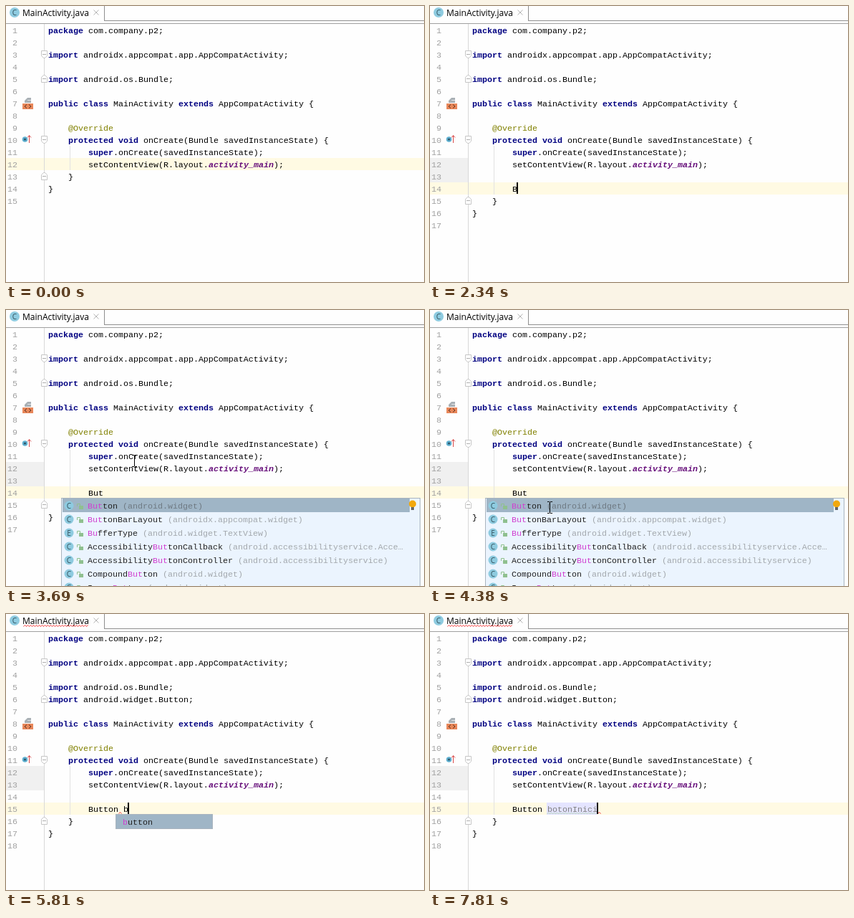
Write an HTML page with a canvas that moves like this. It is 584 px wide and 385 px high and loops after 8 s.

```html
<!DOCTYPE html>
<html lang="en">
<head>
<meta charset="utf-8">
<title>Code editor</title>
<style>
html, body { margin: 0; width: 584px; height: 385px; overflow: hidden; background: #fefefe; }
canvas { display: block; }
</style>
</head>
<body>
<canvas id="stage" width="584" height="385"></canvas>
<script>
const c = document.getElementById('stage').getContext('2d');
const LOOP = 8000, CELL = 7, ROW = 17, LEFT = 58, TOP = 25;
const MONO = "11.667px 'Liberation Mono', 'Courier New', monospace";
const INK = { k: '#000080', a: '#808000', f: '#660e7a', t: '#000', u: '#808080' };
const STYLE = { k: 'bold ', f: 'italic bold ' };

const rowTop = n => TOP + (n - 1) * ROW;
const colX = n => LEFT + n * CELL;
const textX = n => colX(n) + 1;

// Value of the last [time, value] step reached at t
function at(t, steps) {
  let v = null;
  for (const s of steps) if (t >= s[0]) v = s[1];
  return v;
}
function box(x, y, w, h, color) {
  c.fillStyle = color;
  c.fillRect(x, y, w, h);
}
function text(s, x, y, color, style = '') {
  c.font = style + MONO;
  c.fillStyle = color;
  c.fillText(s, x, y);
  return x + s.length * CELL;
}
function path(points, stroke, fill) {
  c.beginPath();
  points.forEach(([x, y], i) => i ? c.lineTo(x, y) : c.moveTo(x, y));
  if (fill) { c.closePath(); c.fillStyle = fill; c.fill(); }
  if (stroke) { c.strokeStyle = stroke; c.lineWidth = 1; c.stroke(); }
}
function disc(x, y, r, color) {
  c.beginPath();
  c.arc(x, y, r, 0, Math.PI * 2);
  c.fillStyle = color;
  c.fill();
}
function wave(x0, x1, y, color) {
  const pts = [];
  for (let x = x0, i = 0; x <= x1; x += 2, i++) pts.push([x + .5, y + (i % 2 ? 0 : 2)]);
  path(pts, color);
}
function badge(x, y, letter, r = 7) {
  disc(x, y, r, '#8ecbe0');
  c.textAlign = 'center';
  c.font = "10px 'Open Sans', sans-serif";
  c.fillStyle = '#31505c';
  c.fillText(letter, x, y + 3.6);
  c.textAlign = 'left';
}

// Markup: "x:words" pieces joined by "|", x being the ink
const code = [
  'k:package|t: com.company.p2;', '',
  'k:import|t: androidx.appcompat.app.AppCompatActivity;', '',
  'k:import|t: android.os.Bundle;', '',
  'k:public class|t: MainActivity |k:extends|t: AppCompatActivity {', '',
  'a:    @Override',
  'k:    protected void|t: onCreate(Bundle savedInstanceState) {',
  'k:        super|t:.onCreate(savedInstanceState);',
  't:        setContentView(R.layout.|f:activity_main|t:);',
  't:    }', 't:}', ''
];
function drawLine(src, n) {
  let x = textX(0);
  if (!src) return;
  for (const part of src.split('|')) {
    const ink = part[0];
    x = text(part.slice(2), x, rowTop(n) + 13, INK[ink], STYLE[ink]);
  }
}

const typed = [
  [0, ''], [2340, 'B'], [2490, 'Bu'], [2710, 'But'], [4520, 'Button'], [5360, 'Button '],
  [5650, 'Button b'], [6030, 'Button bot'], [6170, 'Button boto'], [6620, 'Button boton'],
  [7070, 'Button botonI'], [7230, 'Button botonIn'], [7370, 'Button botonIni'],
  [7510, 'Button botonInic'], [7670, 'Button botonInici']
];
const caretOn = [[0, false], [970, true], [3250, false], [3768, true], [4380, false], [4520, true]];
const extraRows = [[0, 0], [1260, 1], [1570, 2]];
const analysed = [[0, 0], [6400, 4], [6930, 5], [7230, 6], [7370, 8], [7510, 9], [7810, 10]];
const pointer = [
  [0, null], [290, [500, 371]], [370, [485, 300]], [450, [476, 244]],
  [590, [472, 238]], [670, [468, 232]], [810, [440, 226]], [890, [412, 221]], [970, [391, 220]],
  [1260, null], [3250, [391, 200]], [3324, [375, 160]], [3398, [343, 131]], [3472, [298, 130]],
  [3546, [248, 152]], [3620, [204, 186]], [3690, [179, 210]], [3768, [172, 242]],
  [3842, [168, 262]], [3916, [167, 272]], [3990, [167, 275]],
  [4750, [190, 274]], [4823, [215, 272]], [4897, [231, 272]], [4970, [234, 272]], [5360, null]
];

const items = [
  ['C', 'Button', '(android.widget)'],
  ['C', 'ButtonBarLayout', '(androidx.appcompat.widget)'],
  ['E', 'BufferType', '(android.widget.TextView)'],
  ['C', 'AccessibilityButtonCallback', '(android.accessibilityservice.Acce…'],
  ['C', 'AccessibilityButtonController', '(android.accessibilityservice)'],
  ['C', 'CompoundButton', '(android.widget)'],
  ['C', 'ImageButton', '(android.widget)']
];

function matched(name, query, x, y) {
  let q = query;
  while (!name.includes(q)) q = q.slice(0, -1);
  const i = name.indexOf(q);
  x = text(name.slice(0, i), x, y, '#222');
  x = text(q, x, y, '#d03fd0');
  return text(name.slice(i + q.length), x, y, '#222');
}
function drawLock(x, y) {
  box(x + 2, y, 6, 5, '#8fc08f');
  path([[x - .5, y + 1], [x - .5, y - 2.5], [x + 3.5, y - 2.5], [x + 3.5, y]], '#8fc08f');
}
function drawList(query, count, bulb) {
  const h = count * 19 + 2;
  box(77, 262, 502, h, '#a9b4be');
  box(78, 263, 500, h - 2, '#ebf4fe');
  box(79, 263, 485, 19, '#9fb5c6');
  items.slice(0, count).forEach(([kind, name, where], i) => {
    const y = 273 + i * 19;
    badge(88, y, kind, 6.5);
    drawLock(100, y);
    const x = matched(name, query, 114, y + 4);
    text(where, x + CELL, y + 4, i ? '#a3a8ad' : '#6f7a83');
  });
  if (count === 3) {
    box(564, 306, 14, 14, '#b9bec3');
    box(565, 307, 12, 12, '#e6e8ea');
    c.font = "bold 12px 'DejaVu Sans', sans-serif";
    c.fillStyle = '#555';
    c.fillText('π', 567, 317);
  }
  if (bulb) {
    disc(568, 270.5, 5, '#f2a80c');
    box(566, 275, 4, 4, '#666');
  }
}
function drawHint() {
  box(153, 279, 136, 21, '#a9b4be');
  box(154, 280, 134, 19, '#9fb5c6');
  matched('button', 'b', 163, 294);
}

function drawTabs(error) {
  box(0, 0, 584, 25, '#fefefe');
  box(137, 0, 1, 21, '#8f8f8f');
  box(137, 20, 447, 1, '#8f8f8f');
  box(0, 24, 584, 1, '#a0a0a0');
  badge(12, 9, 'C');
  c.font = "12px 'Open Sans', 'Noto Sans', sans-serif";
  c.fillStyle = '#000';
  c.fillText('MainActivity.java', 23, 14);
  path([[122.5, 5.5], [129.5, 12.5]], '#b4b4b4');
  path([[129.5, 5.5], [122.5, 12.5]], '#b4b4b4');
  if (error) wave(24, 115, 15.5, '#f03030');
}
function drawFold(n, dir) {
  const y = rowTop(n) + 9;
  const pts = [[-4, -5], [4, -5], [4, 2], [1, 5], [-1, 5], [-4, 2], [-4, -5]];
  path(pts.map(([a, b]) => [53.5 + a, y + b * dir - .5]), '#c6c6c6', '#fff');
  box(51, y - 1, 5, 1, '#b0b0b0');
}
function drawLayoutIcon(y) {
  box(26, y - 8, 9, 7, '#a9b0b5');
  path([[26, y - 8], [30, y - 8], [26, y - 4]], null, '#fefefe');
  box(30, y - 5, 5, 1, '#e3e6e8');
  box(23, y, 15, 8, '#e8875a');
  path([[29, y + 1.5], [26, y + 4], [29, y + 6.5]], '#5a2f1c');
  path([[32, y + 1.5], [35, y + 4], [32, y + 6.5]], '#5a2f1c');
}
function drawOverrideIcon(y) {
  disc(26.5, y, 3.8, '#5fb0d0');
  disc(26.5, y, 1.6, '#2c5468');
  path([[32.5, y + 5], [32.5, y - 5]], '#d84a4a');
  path([[30, y - 2.5], [32.5, y - 5.5], [35, y - 2.5]], '#d84a4a');
}
function drawPointer([x, y]) {
  box(x, y - 7, 1, 15, '#000');
  for (const dy of [-8, 8]) {
    box(x - 3, y + dy, 3, 1, '#000');
    box(x + 1, y + dy, 3, 1, '#000');
  }
}

function draw(t) {
  const imported = t >= 4520 ? 1 : 0;
  const extra = at(t, extraRows);
  const errors = t >= 4823;
  const word = at(t, typed);
  const active = 12 + extra + imported;
  const y = rowTop(active);

  const lines = code.slice();
  lines.splice(12, 0, ...Array(extra).fill(''));
  if (imported) lines.splice(5, 0, 'k:import|t: android.widget.Button;');

  box(0, 0, 584, 385, '#fefefe');
  if (extra) box(0, 212, 53, extra * ROW, '#f0f0f0');
  box(0, y, 584, ROW, '#fffae3');
  box(53, 25, 1, 360, '#d9d9d9');

  const guide = rowTop(11 + imported);
  box(89, guide, 1, (2 + extra) * ROW, '#e2e2e2');

  // Usages of the word under the caret
  if (t >= 4970 && t < 5650) {
    box(colX(22), rowTop(6), 42, ROW, '#e4e4ff');
    box(colX(8), y, 42, ROW, '#e4e4ff');
  }
  const known = at(t, analysed);
  if (known) box(colX(15), y, known * CELL, ROW, '#e4e4ff');

  lines.forEach((line, i) => {
    const n = String(i + 1);
    text(n, 16 - n.length * CELL, rowTop(i + 1) + 13, '#a0a0a0');
    drawLine(line, i + 1);
  });

  drawFold(3, 1);
  drawFold(errors ? 6 : 5, -1);
  drawFold(10 + imported, 1);
  drawFold(13 + extra + imported, -1);
  drawLayoutIcon(rowTop(7 + imported) + 9);
  drawOverrideIcon(rowTop(10 + imported) + 8);

  if (extra === 2) {
    const split = known ? 7 + known : word.length;
    text(word.slice(0, 7), textX(8), y + 13, INK.t);
    text(word.slice(7, split), textX(15), y + 13, known ? INK.u : INK.t);
    text(word.slice(split), textX(8 + split), y + 13, INK.t);
    if (known) wave(colX(15), colX(15 + known) - 1, y + 14, '#b5d3b5');
  }
  if (errors) {
    const end = t < 6400 ? 6 : word.length;
    wave(colX(8 + end) + 1, colX(9 + end) - 1, y + 13.5, '#f03030');
  }

  if (t >= 2570 && t < 4520) drawList(word, t >= 2710 && t < 2790 ? 3 : 7, t >= 3250);
  if (t >= 5810 && t < 5870) drawHint();

  if (at(t, caretOn)) {
    const x = extra ? colX(8 + word.length) : 387;
    box(x, y, 2, 16, '#000');
  }
  drawTabs(errors);
  const p = at(t, pointer);
  if (p) drawPointer(p);
}

function tick() {
  draw(performance.now() % LOOP);
  requestAnimationFrame(tick);
}
tick();
</script>
</body>
</html>
```
